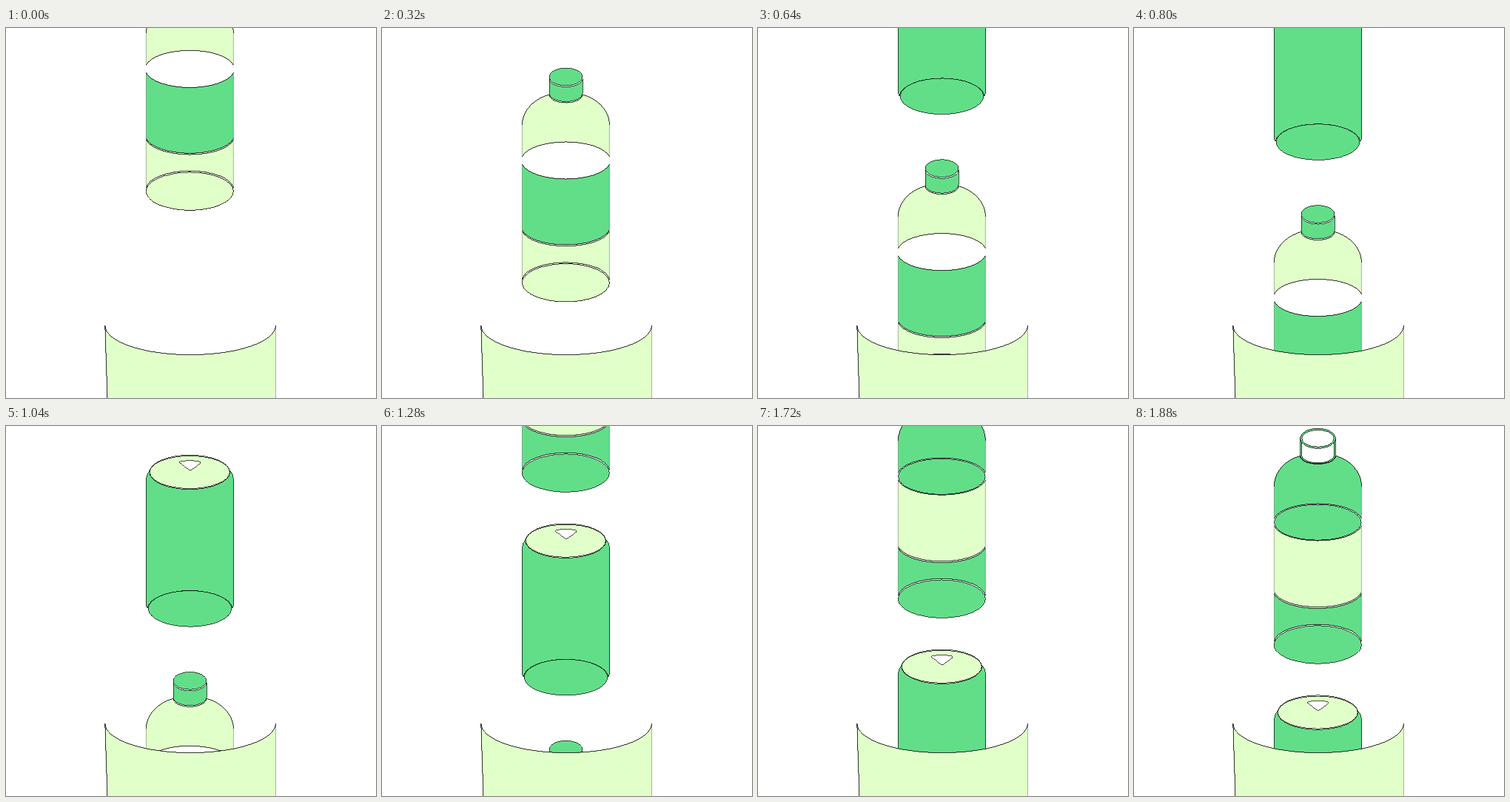
Animation, 500 px wide and 500 px high, one loop 1.92 s. Source, as an HTML page:

```html
<!DOCTYPE html>
<html lang="en">
<head>
<meta charset="utf-8">
<title>Falling bottles</title>
<style>
  html, body { margin: 0; width: 100%; height: 100%; overflow: hidden; background: #fff; }
  svg { display: block; width: 100vw; height: 100vh; }
  path, ellipse { stroke: #000; stroke-width: .7; shape-rendering: crispEdges; }
  .soft { stroke-width: .3; shape-rendering: auto; }
</style>
</head>
<body>
<svg id="stage" viewBox="0 0 500 500"></svg>
<script>
const GREEN = '#62de88', LIGHT = '#e1ffc9', WHITE = '#fff';
const LOOP = 1920, STEP = 40, FALL = 15.46;
const LEFT = 189.4, RIGHT = 307.4;

const path = (d, fill) => `<path d="${d}" fill="${fill}"/>`;
const soft = (d, fill) => `<path class="soft" d="${d}" fill="${fill}"/>`;
const line = d => path(d, 'none');
const oval = (cx, cy, rx, ry, fill) =>
  `<ellipse cx="${cx}" cy="${cy}" rx="${rx}" ry="${ry}" fill="${fill}"/>`;

// Side wall of a cylinder: faint sides, firm top and bottom edges.
function wall(top, bottom, fill, arched = false) {
  const upper = `A60 24.5 0 0 0 ${RIGHT} ${top}`;
  const lower = `A${arched ? '59.2 25 0 0 0' : '60 24.5 0 0 1'} ${LEFT} ${bottom}`;
  return soft(`M${LEFT} ${top}${upper}V${bottom}${lower}Z`, fill)
    + line(`M${LEFT} ${top}${upper}M${RIGHT} ${bottom}${lower}`);
}

// Shoulders from the neck down to an arched lower edge.
function shoulders(neck, bottom, fill, half = 22.5) {
  const a = 248.5 - half, b = 248.5 + half, side = neck + 41;
  const collar = `A${half} 11 0 0 0 ${b} ${neck}`;
  const right = `C${b + 22} ${neck + 6} ${RIGHT} ${neck + 23} ${RIGHT} ${side}`;
  const arch = `A60 24.5 0 0 0 ${LEFT} ${bottom}`;
  const left = `C${LEFT} ${neck + 23} ${a - 22} ${neck + 6} ${a} ${neck}`;
  return soft(`M${a} ${neck}${collar}${right}V${bottom}${arch}V${side}${left}Z`, fill)
    + line(`M${a} ${neck}${collar}${right}M${RIGHT} ${bottom}${arch}M${LEFT} ${side}${left}`);
}

function cappedBottle() {
  return shoulders(90, 174, LIGHT)
    + path('M226 68.5A22.5 11 0 0 0 271 68.5V88.4A22.5 11 0 0 1 226 88.4Z', GREEN)
    + oval(248.5, 66, 22.5, 11.8, GREEN)
    + wall(184, 272.9, GREEN)
    + wall(274.7, 339.8, LIGHT, true)
    + oval(248.3, 344.3, 59, 25.7, WHITE)
    + oval(248.3, 344.3, 59, 25.7, LIGHT);
}

function can() {
  return path(`M194 153Q189.6 159 ${LEFT} 165V335L191 339
      A57.6 25.2 0 0 1 306 339L307.6 335V165Q307 157 302.5 153
      A54.3 23.5 0 0 1 194 155Z`, GREEN)
    + oval(248.3, 155.2, 54.3, 23.2, WHITE)
    + oval(248.3, 155.2, 54, 22, LIGHT)
    + path('M234.5 143Q233 140.3 240 140Q249 138.7 257 140Q265 140.5 262 143.5Q258 147 249 153Q240 147 234.5 143Z', WHITE)
    + oval(248.5, 339.6, 56.3, 24.3, GREEN);
}

function openBottle() {
  return shoulders(40.5, 125, GREEN, 24)
    + path('M224.7 17V40A23.8 11 0 0 0 272.3 40V17Z', GREEN)
    + path('M226.7 17V39A21.8 11 0 0 0 270.3 39V17Z', WHITE)
    + oval(248.5, 16.8, 23.8, 13.5, GREEN)
    + oval(248.5, 16.8, 21.6, 11.3, WHITE)
    + oval(248.3, 130.2, 58.8, 24, GREEN)
    + wall(135, 224.6, LIGHT)
    + wall(226.5, 291, GREEN, true)
    + oval(248.3, 295.5, 59, 25.7, GREEN);
}

// Each item is drawn at its pose for the given step count.
const items = [
  { draw: cappedBottle, at: 8 },
  { draw: can, at: 32 },
  { draw: openBottle, at: 47 }
];
const rim = 'M133.8 402A115.35 39.6 0 0 0 364.5 402';
const bin = soft(rim + 'V501H137Z', LIGHT) + line(rim) + line('M133.8 402L137 501');

const stage = document.getElementById('stage');
stage.innerHTML = items.map(item => `<g>${item.draw()}</g>`).join('') + bin;
const groups = stage.querySelectorAll('g');

function render(time) {
  const step = Math.floor((time % LOOP) / STEP);
  items.forEach((item, i) =>
    groups[i].setAttribute('transform', `translate(0 ${(step - item.at) * FALL})`));
}

const start = performance.now();
function tick() {
  render(performance.now() - start);
  requestAnimationFrame(tick);
}
tick();
</script>
</body>
</html>
```
